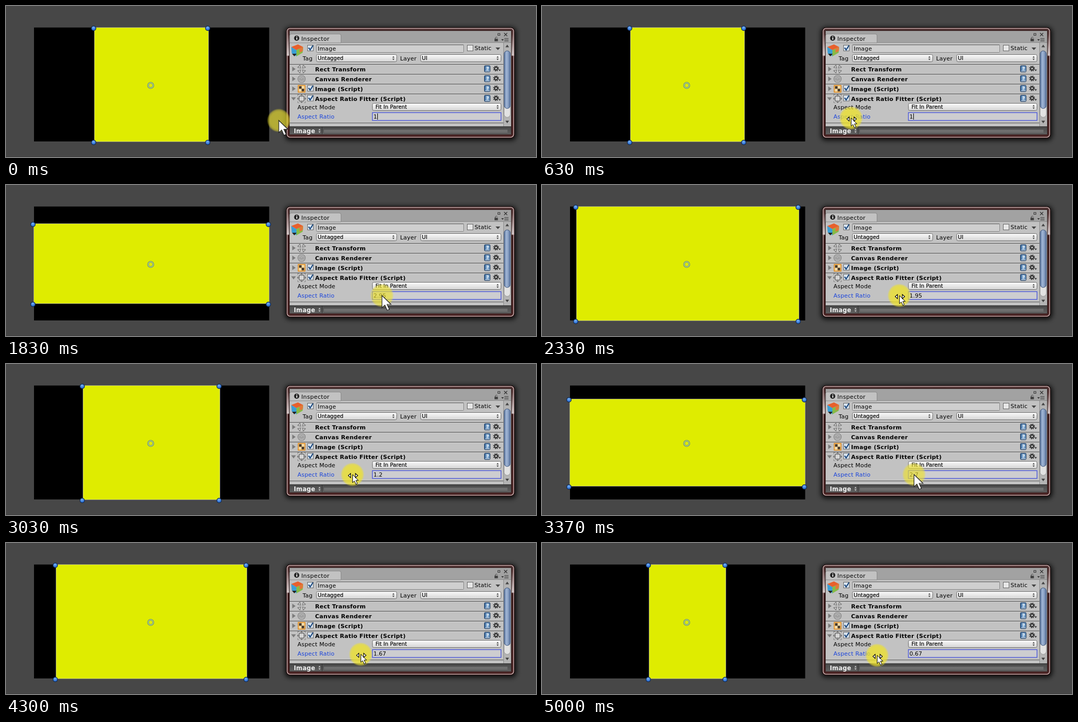
Recreate the animation shown at these times as an HTML page. Size 1022 by 291 pixels, loop 5170 ms.

```html
<!DOCTYPE html>
<html lang="en">
<head>
<meta charset="utf-8">
<title>Aspect Ratio Fitter</title>
<style>
html, body { margin: 0; width: 100%; height: 100%; overflow: hidden; background: #474747; }
svg { display: block; }
text { font-family: "DejaVu Sans", sans-serif; font-size: 11px; letter-spacing: .2px; fill: #000; white-space: pre; }
.b { font-weight: bold; letter-spacing: .25px; }
.s { font-size: 10px; letter-spacing: .1px; stroke: #000; stroke-width: .2px; }
</style>
</head>
<body>
<svg id="stage" width="1022" height="291" viewBox="0 0 1022 291">
  <defs>
    <radialGradient id="halo">
      <stop offset=".72" stop-color="#eee22c"/>
      <stop offset=".86" stop-color="#eee22c" stop-opacity=".8"/>
      <stop offset="1" stop-color="#eee22c" stop-opacity="0"/>
    </radialGradient>
    <radialGradient id="knob" cx=".45" cy=".3" r=".7">
      <stop offset="0" stop-color="#7ab4f6"/>
      <stop offset="1" stop-color="#1a5fcb"/>
    </radialGradient>
    <linearGradient id="drop" x2="0" y2="1">
      <stop offset="0" stop-color="#fafafa"/>
      <stop offset="1" stop-color="#d4d4d4"/>
    </linearGradient>
    <linearGradient id="thumb">
      <stop offset="0" stop-color="#5d779f"/>
      <stop offset=".4" stop-color="#a3b8d8"/>
      <stop offset="1" stop-color="#5c769f"/>
    </linearGradient>
    <linearGradient id="frame" x2="0" y2="1">
      <stop offset="0" stop-color="#4a2c2c"/>
      <stop offset=".06" stop-color="#5a3c3c"/>
      <stop offset=".25" stop-color="#cfc6c6"/>
      <stop offset=".26" stop-color="#3a1a1a"/>
      <stop offset="1" stop-color="#4a2424"/>
    </linearGradient>
    <linearGradient id="bar" x2="0" y2="1">
      <stop offset="0" stop-color="#484848"/>
      <stop offset="1" stop-color="#606060"/>
    </linearGradient>
    <filter id="blur" x="-10%" y="-15%" width="120%" height="130%"><feGaussianBlur stdDeviation="5"/></filter>
  </defs>
  <rect width="1022" height="291" fill="#474747"/>
  <rect y="290" width="1022" height="1" fill="#3e3e3e"/>
  <rect x="54" y="41.5" width="453.5" height="219.5" fill="#000"/>
  <rect id="image" fill="#dfec00"/>
  <rect id="outline" fill="none" stroke="#a2a580"/>
  <g id="knobs"></g>
  <g fill="none">
    <circle cx="279" cy="153" r="5" stroke="#84a968" stroke-width="3.6"/>
    <circle cx="279" cy="153" r="4.8" stroke="#a9c98a" stroke-width="1.2"/>
  </g>
  <g id="panel"></g>
  <text id="value" x="708.5" y="217" style="letter-spacing:0"></text>
  <rect id="caret" x="716" y="207" width="1" height="12" fill="#000"/>
  <circle id="spot" r="23" fill="url(#halo)"/>
  <circle id="ring" cx="653" cy="212" fill="none" stroke="#f0762a" stroke-width="5"/>
  <path id="arrow" d="M0 0V23.5L5.6 18.4L10 28.6L14.2 26.8L9.8 17H17.4Z" fill="#fff" stroke="#222" stroke-width="1.2"/>
  <g id="drag" fill="#fff" stroke="#000">
    <path d="M.3 0V15.6L3.8 12.4L6.8 18.8L9.6 17.5L6.7 11.3H11.4Z"/>
    <path d="M-3.5 -2V6L-8 2ZM5.8 -2V6L10.4 2Z" stroke-width="1.1"/>
  </g>
</svg>
<script>
const $ = id => document.getElementById(id);
const set = (el, attrs) => { for (const a in attrs) el.setAttribute(a, attrs[a]); };

const rect = (x, y, w, h, fill, extra = '') =>
  `<rect x="${x}" y="${y}" width="${w}" height="${h}" fill="${fill}" ${extra}/>`;
const path = (d, fill, extra = '') => `<path d="${d}" fill="${fill}" ${extra}/>`;
const label = (x, y, str, cls = '', extra = '') =>
  `<text x="${x}" y="${y}" class="${cls}" ${extra}>${str}</text>`;
const line = (d, color, w = 1) => path(d, 'none', `stroke="${color}" stroke-width="${w}"`);

const upDown = (x, y, c) => path(`M${x - 2} ${y - 1}h4l-2 -3ZM${x - 2} ${y + 1}h4l-2 3Z`, c);

const dropdown = (x, y, w, str) =>
  rect(x + .5, y + .5, w - 1, 14, 'url(#drop)', 'rx="3" stroke="#6c6c6c"') +
  label(x + (w > 200 ? 6.5 : 3), y + 11.2, str, 's') + upDown(x + w - 7, y + 7.5, '#444');

const check = (x, y, on) =>
  rect(x + .5, y + .5, 11, 11, on ? '#dce6f0' : '#e6e6e6', 'stroke="#666"') +
  (on ? line(`M${x + 2.5} ${y + 5.5}l3 4l5.5 -8.5`, '#1d4a80', 2.2) : '');

const book = (x, y) =>
  rect(x + .5, y - 6, 11, 12, '#3e6c9f', 'rx="1.5" stroke="#1e3a5c"') +
  rect(x + 3, y - 4.5, 7.5, 8, '#7fa6cc') +
  line(`M${x + 2} ${y + 4.5}h9`, '#e4ecf4') +
  label(x + 4.2, y + 3, '?', 'b', 'style="font-size:8px;fill:#fff"');

const gear = (x, y) =>
  `<circle cx="${x}" cy="${y}" r="4.4" fill="none" stroke="#333" stroke-width="2.2" stroke-dasharray="1.9 1.55"/>` +
  `<circle cx="${x}" cy="${y}" r="2.8" fill="none" stroke="#333" stroke-width="2"/>` +
  path(`M${x + 4.5} ${y + 2}h5l-2.5 3Z`, '#333');

const icons = [
  y => [0, 90, 180, 270].map(a =>
    path('M-3 -7.5H3L0 -2.5Z', '#ddd', `stroke="#666" transform="translate(570 ${y}) rotate(${a + 45})"`)).join(''),
  y => [7, 4.5, 2].map(r =>
    `<circle cx="570" cy="${y}" r="${r}" fill="#ccc" stroke="#777" stroke-width="1.2"/>`).join(''),
  y => rect(563.5, y - 6.5, 13, 13, '#f4d9a4', 'stroke="#e08a1c" stroke-width="1.6"') +
    rect(565, y - 5, 5, 5, '#4a3a2a') + rect(570, y, 5, 5, '#4a3a2a'),
  y => rect(565.5, y - 4.5, 9, 9, '#d6d6d6', 'stroke="#555"') +
    [0, 90, 180, 270].map(a =>
      path('M-3 -6H3L0 -8.5Z', '#666', `transform="translate(570 ${y}) rotate(${a})"`)).join('') +
    line(`M562.5 ${y - 5}v-3h3M574.5 ${y - 8}h3v3M577.5 ${y + 5}v3h-3M565.5 ${y + 8}h-3v-3`, '#888')
];

const row = (title, i) => {
  const y = 121.5 + i * 19, open = i === 3;
  return line(`M547 ${y - 9}H959`, '#4c4c4c') + line(`M547 ${y - 8}H959`, '#cecece') +
    path(open ? `M550 ${y - 2.5}h9l-4.5 6Z` : `M552 ${y - 4.5}v9l6.5 -4.5Z`, '#7c7c7c') +
    icons[i](y) + (i > 1 ? check(581, y - 7, true) : '') +
    label(596, y + 4.5, title, 'b') + book(922, y - .5) + gear(945, y - 1);
};

$('panel').innerHTML =
  rect(538, 41, 446, 218, '#000', 'rx="9" opacity=".85" filter="url(#blur)"') +
  rect(540.5, 41.5, 440, 213, 'url(#frame)', 'rx="7" stroke="#170a0a"') +
  rect(542.2, 43.2, 436.6, 209.6, 'none', 'rx="5.5" stroke="#d3bcbc" stroke-width="1.3"') +
  rect(546.5, 47.5, 428, 200, '#c2c2c2', 'stroke="#2c1818"') +
  // tab strip
  rect(547, 48, 427, 22, '#a2a2a2') + line('M547 70.5H974', '#8a8a8a') +
  path('M547 71V57q0 -3 3 -3H643q3 0 3 3V71Z', '#c2c2c2', 'stroke="#7d7d7d" stroke-width=".8"') +
  '<circle cx="560.5" cy="62" r="5" fill="#222"/>' +
  rect(559.8, 61, 1.8, 4, '#fff') + rect(559.8, 58.5, 1.8, 1.6, '#fff') +
  label(569.5, 66.6, 'Inspector', '', 'style="letter-spacing:.35px"') +
  rect(948.5, 53, 4, 3.5, 'none', 'stroke="#333"') + line('M960.5 52l6 6M966.5 52l-6 6', '#333', 1.2) +
  rect(942, 63, 6.5, 5, '#444') + line('M943.5 63v-2q2 -2.5 4 0', '#444') +
  path('M955 64h5l-2.5 3Z', '#333') + line('M961 62.5h8M961 65h8M961 67.5h8', '#444') +
  // object header
  path('M550 79L563 74L573 79L560 85Z', '#e8602c') +
  path('M550 79L560 85V97L551 91Z', '#3c9fd6') +
  path('M560 85L573 79L572 90L560 97Z', '#86bb48') +
  path('M566 82L573 79L572.3 87L566 90Z', '#e07a3a') +
  path('M551.5 92h9l-4.5 5Z', '#222') +
  check(581, 75, true) +
  rect(598.5, 74.5, 284, 15, '#cfcfcf', 'rx="1" stroke="#858585"') + line('M599 75H882', '#707070') +
  label(601, 86, 'Image') + check(889, 75, false) + label(903.5, 85, 'Static') +
  path('M944 80h9l-4.5 5Z', '#444') +
  label(572, 105, 'Tag') + dropdown(598, 93, 156, 'Untagged') +
  label(760, 105, 'Layer') + dropdown(799, 93, 156, 'UI') +
  ['Rect Transform', 'Canvas Renderer', 'Image (Script)', 'Aspect Ratio Fitter (Script)'].map(row).join('') +
  label(562, 199, 'Aspect Mode') + dropdown(706, 187, 249, 'Fit In Parent') +
  label(562, 217, 'Aspect Ratio', '', 'style="fill:#1a44dc"') +
  rect(706.5, 205.5, 248, 15, '#cdcdd0', 'stroke="#4452dd" stroke-width="1.3"') +
  line('M547 225.5H959', '#4c4c4c') + line('M547 226.5H959', '#cecece') +
  // scroll bar
  rect(959, 71, 15, 161, '#b4b4b4') + line('M959.5 71V232', '#8c8c8c') +
  path('M963 79.5h7l-3.5 -5Z', '#444') + path('M963 221h7l-3.5 5Z', '#444') +
  rect(960.5, 86.5, 12, 128, '#e2e2e2', 'rx="6" stroke="#999"') +
  rect(960.5, 86.5, 12, 111, 'url(#thumb)', 'rx="6" stroke="#40577c"') +
  // preview bar
  rect(547, 232, 427, 15.5, 'url(#bar)') + line('M547 232.5H974', '#2c2c2c') +
  label(555, 244.8, 'Image', 'b', 'style="font-size:11.5px;fill:#f2f2f2"') +
  upDown(604.5, 240.5, '#ccc') + line('M609.5 233V247', '#333') +
  line('M613 239.5H967M613 242.5H967', '#999');

$('knobs').innerHTML =
  '<circle r="4.4" fill="url(#knob)" stroke="#10284f" stroke-width="1.2"/>'.repeat(4);
const knobs = [...$('knobs').children];

// step, pointer x, pointer y, ratio
const keys = [
  [11, 526, 220.5, 1], [26, 653, 212, 1], [32, 653, 212, 1], [37, 665, 212, 1.12],
  [45, 703, 213, 2.28], [55, 725, 213, 2.95], [59, 730, 213, 3.1], [61, 730, 213, 3.1],
  [70, 689, 213, 1.95], [77, 664, 213, 1.055], [82, 660, 213, .94], [87, 660, 213, .94],
  [91, 668, 213, 1.2], [103, 725, 213, 2.95], [110, 740.5, 213, 3.53], [114, 740.5, 213, 3.53],
  [115, 736, 213, 3.45], [130, 681, 214.5, 1.58], [145, 646.5, 216, .67], [149, 646.5, 216, .67],
  [150, 646, 216.5, .67]
];

const rise = (i, c) => i < 0 || i > keys.length - 2 ? 0 :
  (keys[i + 1][c] - keys[i][c]) / (keys[i + 1][0] - keys[i][0]);
const slope = (i, c) => {
  const a = rise(i - 1, c), b = rise(i, c);
  return a * b > 0 ? 2 * a * b / (a + b) : 0;
};

// monotone cubic through the keys
function track(k, c) {
  const last = keys.length - 1;
  if (k <= keys[0][0]) return keys[0][c];
  if (k >= keys[last][0]) return keys[last][c];
  const i = keys.findIndex(p => p[0] > k) - 1;
  const p = keys[i], q = keys[i + 1], d = q[0] - p[0];
  const u = (k - p[0]) / d, v = 1 - u;
  return p[c] * v * v * (1 + 2 * u) + q[c] * u * u * (3 - 2 * u) +
    d * u * v * (slope(i, c) * v - slope(i + 1, c) * u);
}

const LOOP = 5170, STEPS_PER_MS = .03, CLICK = 30;

function draw(ms) {
  const k = Math.floor((ms + 3.4) * STEPS_PER_MS);
  const x = track(k, 1), y = track(k, 2), r = track(k, 3);

  const hw = Math.min(110 * r, 227), hh = Math.min(110, 227 / r);
  const left = Math.round(281 - hw), top = Math.round(151.3 - hh);
  const width = Math.round(281 + hw) - left, height = Math.round(151.3 + hh) - top;
  set($('image'), { x: left, y: top, width, height });
  set($('outline'), { x: left - .5, y: top + .5, width, height });
  knobs.forEach((el, i) => set(el, {
    cx: Math.round(279 + (i & 1 ? hw : -hw)),
    cy: Math.round(153 + (i & 2 ? hh : -hh))
  }));

  $('value').textContent = Number(r.toFixed(2));
  $('caret').style.display = k < CLICK ? '' : 'none';

  const scrub = x > 560 && x < 705;
  const at = `translate(${x} ${y})`;
  set($('spot'), { transform: at, opacity: scrub ? .78 : .65 });
  set($('arrow'), { transform: at, display: scrub ? 'none' : 'inline' });
  set($('drag'), { transform: at, display: scrub ? 'inline' : 'none' });

  const age = k - CLICK;
  set($('ring'), {
    r: Math.max(0, 4.6 + age * 1.4),
    opacity: age < 0 ? 0 : Math.max(0, Math.min(.85, (13 - age) / 6))
  });
}

const start = performance.now();
function tick() {
  draw((performance.now() - start) % LOOP);
  requestAnimationFrame(tick);
}
tick();
</script>
</body>
</html>
```
